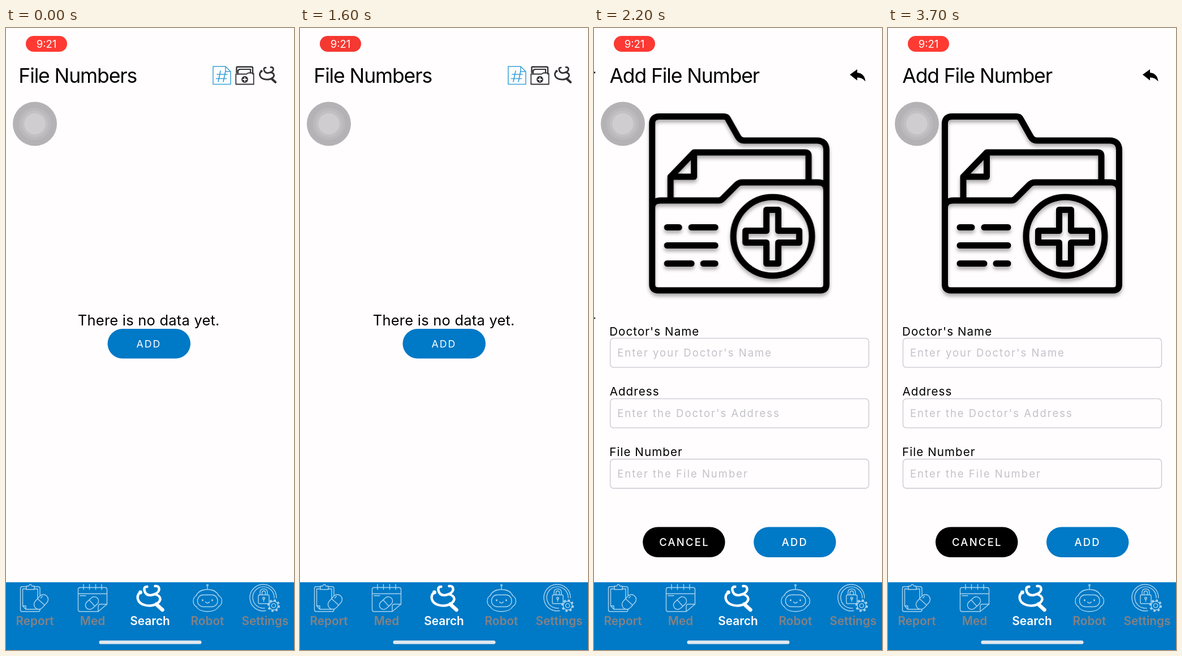
These frames come from a looping animation (509 px wide and 1100 px high, 3.8 s). An HTML page:

```html
<!DOCTYPE html>
<html lang="en">
<head>
<meta charset="utf-8">
<title>File Numbers</title>
<style>
  @property --push { syntax: "<number>"; inherits: true; initial-value: 0; }
  :root { --blue: #0079c6; --paper: #fffdfe; }
  html, body { margin: 0; width: 100%; height: 100%; overflow: hidden; background: var(--paper); }
  svg { display: block; }
  #stage {
    width: 509px; height: 1100px;
    font-family: Inter, Roboto, sans-serif;
    font-optical-sizing: none;
    animation: push 3.8s step-end infinite;
  }
  .list { transform: translateX(calc(var(--push) * -152.7px)); }
  .form { transform: translateX(calc((1 - var(--push)) * 509px)); }
  .press { animation: press 3.8s step-end infinite; }
  .picture { animation: appear 3.8s step-end infinite; filter: drop-shadow(0 5px 3px rgba(0,0,0,.32)); }
  .pill { animation: pulse 3.8s ease-in-out infinite; }

  .title { font-size: 35.5px; letter-spacing: -1.12px; }
  .empty { font-size: 25.5px; letter-spacing: .22px; }
  .label { font-size: 20.6px; letter-spacing: 1.05px; }
  .hint { font-size: 18.5px; letter-spacing: 2px; fill: #c3c2c8; }
  .button { font-size: 18.5px; letter-spacing: 2.2px; font-weight: 500; fill: #fff; }
  .soft { font-size: 17.8px; letter-spacing: 2px; font-weight: 400; }
  .tabs { font-size: 20.8px; font-weight: 600; text-anchor: middle; fill: #828285; }
  .field { fill: none; stroke: #c9c8d0; stroke-width: 1.3; }
  .line { fill: none; stroke-linecap: round; stroke-linejoin: round; }

  /* Critically damped spring, sampled at 10 fps */
  @keyframes push {
    0% { --push: .013; }
    2.63% { --push: .003; }
    5.26% { --push: 0; }
    47.36% { --push: .028; }
    50% { --push: .63; }
    52.63% { --push: .907; }
    55.26% { --push: .979; }
    57.89% { --push: .9957; }
    60.52% { --push: .999; }
    63.15%, 100% { --push: 1; }
  }
  @keyframes press {
    0% { opacity: 1; }
    44.73% { opacity: .4; }
    47.36% { opacity: .22; }
    50% { opacity: .58; }
    52.63%, 100% { opacity: 1; }
  }
  @keyframes appear {
    0% { opacity: 0; }
    57.89%, 100% { opacity: 1; }
  }
  @keyframes pulse {
    0%, 52.6%, 100% { fill: #ff3a33; }
    26.3%, 78.9% { fill: #e1342f; }
  }
</style>
</head>
<body>
<svg id="stage" viewBox="0 0 509 1100">
  <defs>
    <g id="scope" class="line">
      <path stroke-width="4.4" d="M20 4Q14 4 15 10Q17 20 27 19Q39 17 41 10Q42 2 34 3"/>
      <path stroke-width="4.4" d="M33 17Q44 20 43 27C40 36 26 40 14 36C2 32 0 20 8 14"/>
      <path stroke-width="6.5" d="M36 35L47 45"/>
      <circle cx="8" cy="14" r="1.4" stroke-width="4"/>
    </g>
  </defs>

  <rect width="509" height="1100" fill="var(--paper)"/>

  <g class="list">
    <text class="title" x="24.3" y="97">File Numbers</text>
    <g class="line" stroke="#3aa3d9" stroke-width="1.5">
      <path d="M368 68H390L399 77V99.5H368ZM390 68V77H399"/>
      <path stroke-width="1.7" d="M381 76L377 95M390 76L386 95M375 82H393M373.5 89.5H391.5"/>
    </g>
    <g class="line" stroke="#333338" stroke-width="1.8">
      <path stroke-width="2.4" d="M409.5 79V70Q409.5 68.8 411 68.8H436Q438 68.8 438 70.5V81"/>
      <path stroke-width="2.2" d="M412 80V75L415 73H434V79"/>
      <path d="M408.3 81.5H427L430 79.5H438L439.7 81V99.5H408.3Z"/>
      <circle cx="424" cy="91" r="5" fill="#333338"/>
      <path stroke="var(--paper)" d="M424 88V94M421 91H427"/>
    </g>
    <use href="#scope" stroke="#303035" transform="translate(448.5 67.5) scale(.63)"/>
    <text class="empty" x="128.8" y="526">There is no data yet.</text>
    <g class="press">
      <rect x="181.5" y="532" width="146.5" height="52.5" rx="26.2" fill="var(--blue)"/>
      <text class="button soft" x="232.5" y="564.8">ADD</text>
    </g>
  </g>

  <g class="form">
    <rect y="46" width="509" height="934" fill="var(--paper)"/>
    <text class="title" x="25.3" y="97">Add File Number</text>
    <path d="M450 82.5L463 73V79Q476 80 477.5 94.5Q472 87.5 463 87.5V92.7Z"/>

    <g class="picture line" stroke="#000" stroke-width="11">
      <path d="M100.5 453V169Q100.5 156.5 113 156.5H227Q232 156.5 234 160L252 192Q256 199 263 199H391Q408.5 199 408.5 216V453Q408.5 464 398 464H111Q100.5 464 100.5 453Z"/>
      <path d="M100.5 318Q100.5 305 116 305H218Q222 305 225 302L250 277Q254 273 260 273H393Q408.5 273 408.5 287"/>
      <path d="M133 302V263L174.5 220H371Q377 220 377 226V271M133 263H174.5V220"/>
      <path d="M127 352.5H148M170 352.5H212M127 384.5H212M127 416.5H170M191 416.5H212"/>
      <circle cx="313.5" cy="368.5" r="69.5"/>
      <path d="M302.5 321.5H323.5V358.5H360.5V379.5H323.5V416.5H302.5V379.5H265.5V358.5H302.5Z"/>
    </g>

    <text class="label" x="25" y="543.5">Doctor's Name</text>
    <text class="label" x="25.5" y="650.3">Address</text>
    <text class="label" x="25" y="757.2">File Number</text>
    <rect class="field" x="26.5" y="548.7" width="457" height="51.5" rx="6"/>
    <rect class="field" x="26.5" y="655.7" width="457" height="51.5" rx="6"/>
    <rect class="field" x="26.5" y="762.5" width="457" height="51.5" rx="6"/>
    <text class="hint" x="39" y="581.2">Enter your Doctor's Name</text>
    <text class="hint" x="39" y="688">Enter the Doctor's Address</text>
    <text class="hint" x="39" y="795">Enter the File Number</text>

    <rect x="84" y="882.5" width="145.5" height="53.5" rx="26.7"/>
    <rect x="280" y="882.5" width="145.5" height="53.5" rx="26.7" fill="var(--blue)"/>
    <text class="button" x="113" y="915.8">CANCEL</text>
    <text class="button" x="329.5" y="915.8">ADD</text>
  </g>

  <rect y="980.2" width="509" height="119.8" fill="var(--blue)"/>
  <g class="line" stroke="#a9d4ee" stroke-width="1.4">
    <path d="M36 988H28Q25.5 988 25.5 991V1029Q25.5 1032 28.5 1032H57Q60 1032 60 1029V991Q60 988 57 988H50"/>
    <path d="M36 992H29.5V1022L35 1028H56V992H50M29.5 1022H35V1028"/>
    <path d="M36 993V987H40Q43 981 46 987H50V993Z"/>
    <g transform="rotate(-48 62 1015)" fill="var(--blue)">
      <rect x="47.5" y="1006.5" width="29" height="17" rx="8.5"/>
      <path d="M62 1006.5V1023.5M67 1010H71"/>
    </g>

    <path d="M162 1032H131Q127.5 1032 127.5 1028V993Q127.5 989.5 131 989.5H175Q178.5 989.5 178.5 993V1019L163 1032V1023Q163 1019 167 1019H178.5M127.5 1000.5H178.5"/>
    <path d="M137 984V993M147.5 984V993M158.5 984V993M169 984V993M131 1004H141"/>
    <g transform="rotate(-42 152 1017)" fill="var(--blue)">
      <rect x="139" y="1009.5" width="26" height="15" rx="7.5"/>
      <path d="M152 1009.5V1024.5"/>
    </g>

    <path d="M356 987V993M336 1004Q341 993 356 993Q371 993 376 1004M336 1023Q341 1032 356 1032Q371 1032 376 1023"/>
    <path d="M336 1004Q331 1007 331 1013.5Q331 1020 336 1023M376 1004Q381.5 1007 381.5 1013.5Q381.5 1020 376 1023"/>
    <rect x="338.5" y="1002.5" width="35.5" height="21" rx="10"/>
    <path d="M352.5 1015Q356 1019 359.5 1015"/>
    <circle cx="356" cy="985.5" r="1.4"/>
    <path stroke-width="2.6" d="M347.5 1011.5V1012.5M364.5 1011.5V1012.5"/>

    <path d="M459 1030.5A23.5 23.5 0 1 1 478 1008M457 1026A19 19 0 1 1 474 1008"/>
    <rect x="446" y="1002.5" width="19" height="15.5" rx="2"/>
    <path d="M449 1002V998Q449 992 455.5 992Q462 992 462 998V1002M452.5 1002V998.5Q452.5 995.5 455.5 995.5Q458.5 995.5 458.5 998.5V1002M455.5 1010V1014"/>
    <circle cx="455.5" cy="1008.5" r="1.8"/>
    <g fill="var(--blue)">
      <circle cx="473" cy="1021.5" r="7.8"/>
      <circle cx="473" cy="1021.5" r="3.6"/>
    </g>
    <circle cx="473" cy="1021.5" r="9.6" stroke-width="3" stroke-linecap="butt" stroke-dasharray="3.8 3.74"/>
  </g>
  <use href="#scope" stroke="#fff" transform="translate(229.5 984)"/>
  <g class="tabs">
    <text x="51" y="1055.5">Report</text>
    <text x="153" y="1055.5">Med</text>
    <text x="254.5" y="1055.5" fill="#fff">Search</text>
    <text x="356" y="1055.5">Robot</text>
    <text x="458" y="1055.5">Settings</text>
  </g>
  <rect x="164.5" y="1083.3" width="181" height="6.2" rx="3.1" fill="#e1e8ef"/>

  <rect class="pill" x="35" y="14" width="73" height="28" rx="14"/>
  <text x="71.5" y="34.7" font-size="18.5" fill="#fff" text-anchor="middle">9:21</text>

  <circle cx="51" cy="169.5" r="39" fill="#b4b2b5"/>
  <circle cx="51" cy="169.5" r="28.5" fill="#bbb9bc"/>
  <circle cx="51" cy="169.5" r="23.5" fill="#c2c0c3"/>
  <circle cx="51" cy="169.5" r="18.7" fill="#cfcdd0"/>
</svg>
</body>
</html>
```
